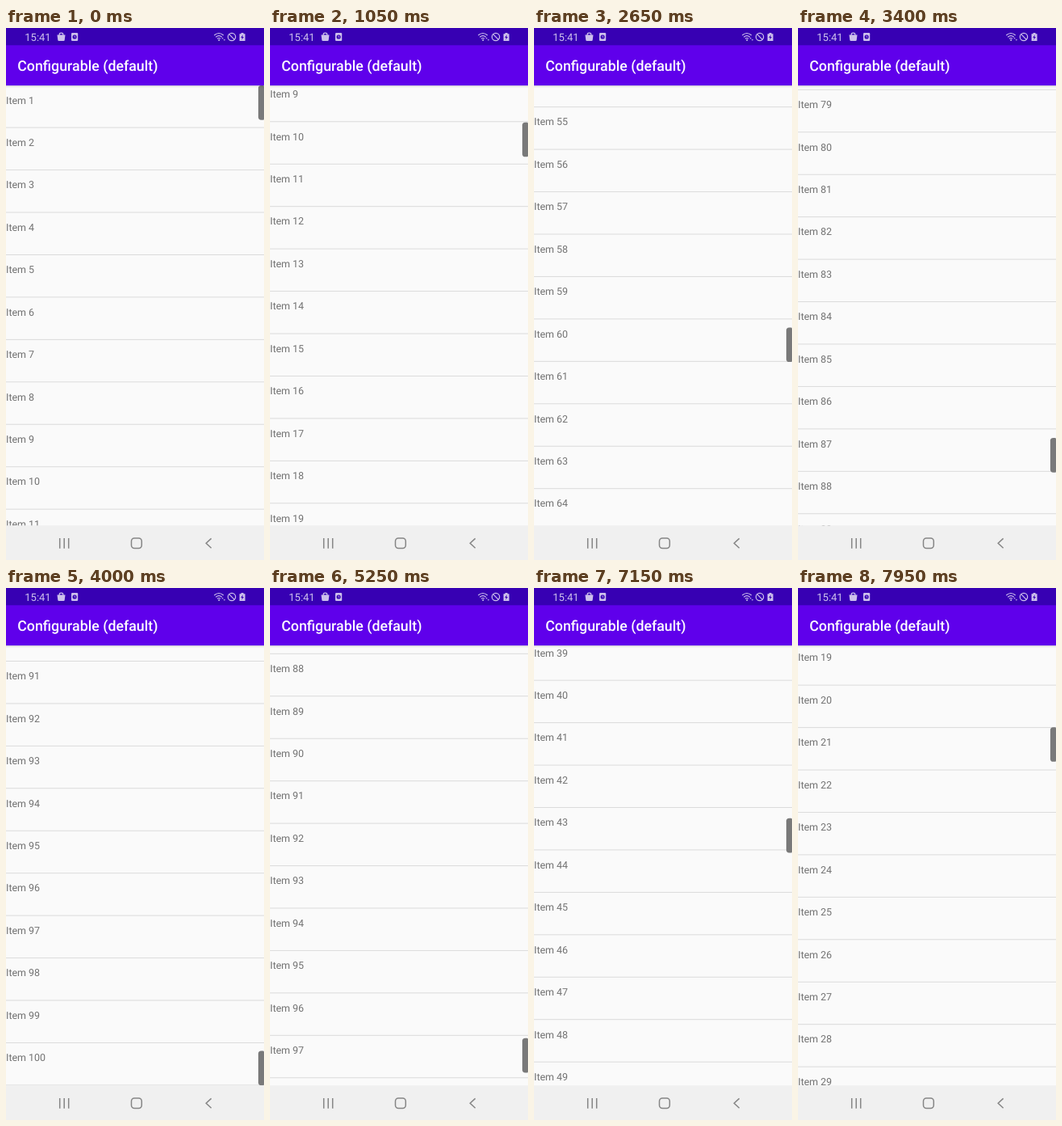
An HTML page for the animation above (8 s loop, 320 px wide and 658 px high).

```html
<!DOCTYPE html>
<html lang="en">
<head>
<meta charset="utf-8">
<title>Configurable (default)</title>
<style>
html, body { margin: 0; width: 100%; height: 100%; overflow: hidden; background: #fafafa; }
svg { display: block; width: 100vw; height: 100vh; }
text { font-family: Roboto, sans-serif; text-rendering: geometricPrecision; }
#list text { font-size: 12.44px; fill: #727272; }
#list rect { fill: #dbdbdb; }
</style>
</head>
<body>
<svg viewBox="0 0 320 658">
  <defs>
    <linearGradient id="shade" x2="0" y2="1">
      <stop stop-opacity=".13"/><stop offset="1" stop-opacity="0"/>
    </linearGradient>
  </defs>
  <rect width="320" height="658" fill="#fafafa"/>
  <g id="list"></g>
  <path id="thumb" d="M316.5 0H319Q320 0 320 1.5V41.2Q320 42.7 319 42.7H316.5Q312.9 42.7 312.9 39V3.6Q312.9 0 316.5 0Z" fill="#797979"/>
  <rect y="71" width="320" height="3" fill="url(#shade)"/>

  <rect width="320" height="71.1" fill="#5f00eb"/>
  <rect width="320" height="21.3" fill="#3700b3"/>
  <text x="14.2" y="53" font-size="17.78" font-weight="500" fill="#fff">Configurable (default)</text>

  <g fill="#cdc0ec">
    <text x="23.3" y="15.7" font-size="13">15:41</text>
    <path d="M63.5 8.6H73.5L72.7 15Q72.5 16 71.5 16H65.5Q64.5 16 64.3 15Z"/>
    <path d="M66.2 9V8Q66.2 6.2 68.5 6.2T70.8 8V9" fill="none" stroke="#cdc0ec" stroke-width="1.2"/>
    <rect x="81" y="6" width="8.2" height="10" rx="1.3"/>
    <circle cx="85.1" cy="11" r="2.6" fill="#3700b3"/>
    <path d="M85.1 9.6V11.2H86.3" fill="none" stroke="#cdc0ec" stroke-width=".8"/>
    <path d="M258.3 9Q264 4 269.7 9M260.2 11.2Q264 8 267.8 11.2M262 13.3Q264 11.7 266 13.3" fill="none" stroke="#cdc0ec" stroke-width="1.2"/>
    <circle cx="264.2" cy="15" r="1"/>
    <path d="M267.3 13.2L268.6 11.8L269.9 13.2ZM269.6 14.2H272.2L270.9 15.8Z"/>
    <g fill="none" stroke="#cdc0ec" stroke-width="1.2">
      <circle cx="280" cy="11" r="4.7"/><path d="M276.7 7.7L283.3 14.3"/>
    </g>
    <path d="M291.6 6H294.6V7.2H296.6V16H289.6V7.2H291.6Z"/>
    <path d="M293.8 8.3L291.2 12H292.8L292.3 14.7L295 10.9H293.4Z" fill="#3700b3"/>
  </g>

  <rect y="615.3" width="320" height="42.7" fill="#f0f0f0"/>
  <g fill="none" stroke="#858585" stroke-width="1.5">
    <path d="M66.7 631V643.7M72.2 631V643.7M77.7 631V643.7"/>
    <rect x="155.5" y="631" width="12.8" height="12.6" rx="3.8"/>
    <path d="M254.6 631.4L248.2 637.3L254.6 643.2"/>
  </g>
</svg>
<script>
const TOP = 71.1, ROW = 52.444, COUNT = 100, VIEW = 544.2, THUMB = 42.7;
const MAX = COUNT * ROW - VIEW;
const LOOP = 8000, STEP = 50;
const list = document.getElementById('list');
const thumb = document.getElementById('thumb');

let rows = '';
for (let i = 0; i < COUNT; i++) {
  const y = TOP + i * ROW;
  rows += `<text y="${y + 22.4}">Item ${i + 1}</text>` +
    `<rect y="${y + ROW - 0.9}" width="320" height="1"/>`;
}
list.innerHTML = rows;

// time in ms, scroll in px, speed in px per ms
const down = [[650, 0, 0.9], [1750, 1382, 1.45], [2650, 2805, 1.66], [3400, 4085, 1.5], [4000, MAX, 0.4]];
const up = [[5250, 4552, -1.35], [6400, 3002, -1.34], [7950, 947, -1.31]];

function follow(path, t) {
  if (t <= path[0][0]) return path[0][1];
  for (let i = 1; i < path.length; i++) {
    const [t0, y0, v0] = path[i - 1], [t1, y1, v1] = path[i];
    if (t > t1) continue;
    const d = t1 - t0, u = (t - t0) / d, w = 1 - u;
    return w * w * ((1 + 2 * u) * y0 + u * d * v0) + u * u * ((3 - 2 * u) * y1 - w * d * v1);
  }
  return path[path.length - 1][1];
}

function draw(now) {
  const t = Math.floor(now % LOOP / STEP) * STEP;
  const y = follow(t < up[0][0] ? down : up, t);
  list.setAttribute('transform', `translate(0 ${-y})`);
  thumb.setAttribute('transform', `translate(0 ${TOP + y / MAX * (VIEW - THUMB)})`);
  requestAnimationFrame(() => draw(performance.now()));
}
draw(performance.now());
</script>
</body>
</html>
```
